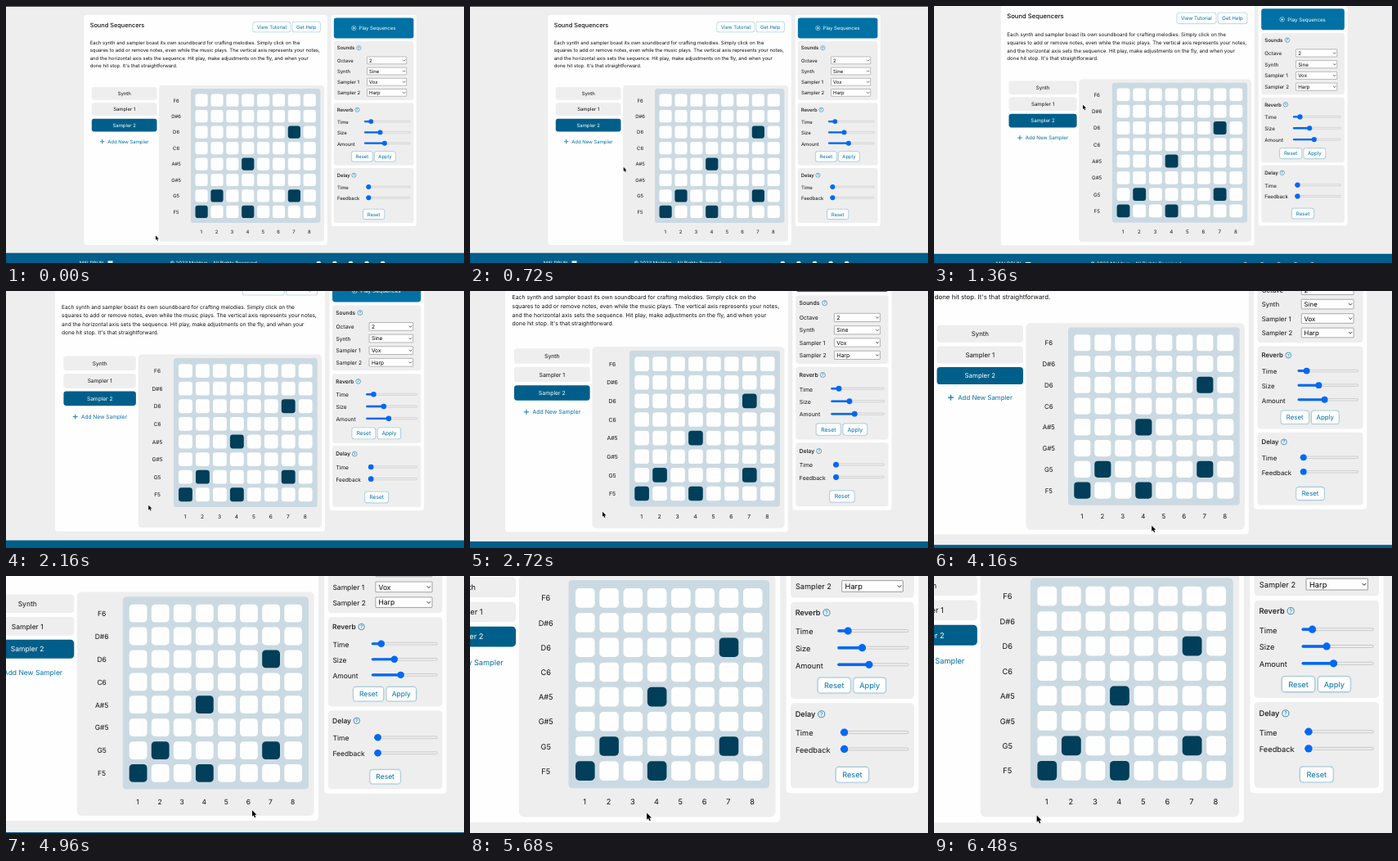
An HTML page for the animation above (6560 ms loop, 560 by 314 pixels).

```html
<!DOCTYPE html>
<html lang="en">
<head>
<meta charset="utf-8">
<title>Sound Sequencers</title>
<style>
  html, body { margin: 0; width: 100%; height: 100%; overflow: hidden; background: #eee; }
  svg { display: block; width: 100vw; height: 100vh; }
  text {
    font-family: Inter, Roboto, sans-serif;
    white-space: pre;
    text-rendering: geometricPrecision;
  }
</style>
</head>
<body>
<svg id="stage" viewBox="0 0 560 314"></svg>
<script>
const NS = 'http://www.w3.org/2000/svg';
const stage = document.getElementById('stage');
const INK = '#111', GREY = '#eee', WHITE = '#fefefe';
const BLUE = '#0071a5', DEEP = '#005f8a', NIGHT = '#003e59', ACCENT = '#0068f6';
const SIZE = 5.93;

function add(tag, attrs, parent = stage) {
  const el = document.createElementNS(NS, tag);
  for (const key in attrs) el.setAttribute(key, attrs[key]);
  return parent.appendChild(el);
}

// Rectangle given by its edges.
function box(x1, y1, x2, y2, fill, rx = 0, more = {}) {
  return add('rect', { x: x1, y: y1, width: x2 - x1, height: y2 - y1, rx, fill, ...more });
}

// Text placed by the middle of its capitals.
function label(str, x, y, fill = INK, anchor = 'start', size = SIZE, weight = 400) {
  const el = add('text', {
    x, y: y + size * 0.36, fill, 'text-anchor': anchor, 'font-size': size, 'font-weight': weight
  });
  el.textContent = str;
}

const line = (d, stroke, width) =>
  add('path', { d, stroke, fill: 'none', 'stroke-width': width, 'stroke-linecap': 'round', 'stroke-linejoin': 'round' });

const ring = (cx, cy, r, stroke) =>
  add('circle', { cx, cy, r, stroke, fill: 'none', 'stroke-width': 0.5 });

// White button with a soft blue glow.
function button(str, x1, y1, x2, y2) {
  for (const width of [2.4, 1.6, 0.8])
    box(x1, y1, x2, y2, WHITE, 2, { stroke: BLUE, 'stroke-width': width, 'stroke-opacity': 0.13 });
  box(x1, y1, x2, y2, WHITE, 2);
  label(str, (x1 + x2) / 2, (y1 + y2) / 2, BLUE, 'middle');
}

function heading(str, y, iconX) {
  label(str, 404.7, y, INK, 'start', SIZE, 500);
  ring(iconX, y, 2.6, BLUE);
  label('?', iconX, y, BLUE, 'middle', 4.2);
}

function select(name, value, y) {
  label(name, 404.9, y);
  box(441.5, y - 4.6, 489.7, y + 4.2, WHITE, 0.4, { stroke: '#666', 'stroke-width': 0.4 });
  label(value, 444, y - 0.1, '#000');
  line(`M485.5 ${y - 0.7}l1.3 1.3l1.3-1.3`, INK, 0.6);
}

function slider(name, y, start, value) {
  label(name, 404.9, y);
  const mid = y - 0.7;
  box(start, mid - 0.95, 494, mid + 0.95, '#efefef', 0.95, { stroke: '#a8a8a8', 'stroke-width': 0.35 });
  box(start, mid - 1.1, value, mid + 1.1, ACCENT, 1.1);
  add('circle', { cx: value, cy: mid, r: 2.96, fill: ACCENT });
}

function drawIntro() {
  box(95.5, 11, 392.8, 291.9, WHITE, 3);
  label('Sound Sequencers', 102.7, 23.2, INK, 'start', 7.35, 500);
  button('View Tutorial', 302.4, 19.7, 347.4, 31.3);
  button('Get Help', 350.5, 19.7, 383.8, 31.3);
  [
    'Each synth and sampler boast its own soundboard for crafting melodies. Simply click on the',
    'squares to add or remove notes, even while the music plays. The vertical axis represents your notes,',
    'and the horizontal axis sets the sequence. Hit play, make adjustments on the fly, and when your',
    "done hit stop. It's that straightforward."
  ].forEach((str, i) => label(str, 102.7, 44.8 + i * 9.37));
}

function drawTabs() {
  ['Synth', 'Sampler 1', 'Sampler 2'].forEach((str, i) => {
    const y = 98.9 + i * 19.4, active = i === 2;
    box(104.8, y, 184.5, y + 15.9, active ? DEEP : GREY, 3);
    label(str, 144.7, y + 8, active ? '#fff' : INK, 'middle');
  });
  line('M115.4 165.7h4.6M117.7 163.4v4.6', BLUE, 0.8);
  label('Add New Sampler', 124.2, 165.7, BLUE);
}

function drawGrid() {
  box(187, 97.1, 389.1, 287.7, GREY, 4);
  box(226, 101.1, 384.4, 265.1, '#cbdae2', 3);
  const on = new Set(['6,2', '3,4', '1,6', '6,6', '0,7', '3,7']);
  const notes = ['F6', 'D#6', 'D6', 'C6', 'A#5', 'G#5', 'G5', 'F5'];
  notes.forEach((note, row) => {
    const y = 115.2 + row * 19.46;
    label(note, 208.1, y + 0.2, INK, 'middle');
    for (let col = 0; col < 8; col++) {
      const x = 239.1 + col * 18.88;
      box(x - 7.6, y - 7.6, x + 7.6, y + 7.6, on.has(`${col},${row}`) ? NIGHT : WHITE, 3.1);
      if (!row) label(col + 1, x - 0.4, 275.6, INK, 'middle');
    }
  });
}

function drawControls() {
  box(397.6, 11, 501.9, 268.9, WHITE, 3);
  box(400.9, 14.4, 498.4, 39.4, BLUE, 3);
  ring(425.4, 27, 2.7, '#fff');
  add('path', { d: 'M424.6 25.6v2.8l2.3-1.4z', fill: '#fff' });
  label('Play Sequences', 431.6, 27, '#fff');

  box(401, 43, 498.4, 115, GREY, 3);
  heading('Sounds', 51.2, 431.4);
  [['Octave', '2'], ['Synth', 'Sine'], ['Sampler 1', 'Vox'], ['Sampler 2', 'Harp']]
    .forEach(([name, value], i) => select(name, value, 66.6 + i * 13.17));

  box(401, 118.4, 498.4, 194.6, GREY, 3);
  heading('Reverb', 126.7, 429.4);
  slider('Time', 141.8, 438, 446.3);
  slider('Size', 155.1, 438, 457.5);
  slider('Amount', 168.4, 438, 462.9);
  button('Reset', 422.9, 178.3, 447.9, 189.6);
  button('Apply', 451.1, 178.3, 475.7, 189.6);

  box(401, 197.9, 498.4, 264.9, GREY, 3);
  heading('Delay', 206.7, 425.4);
  slider('Time', 221.7, 440.4, 443.4);
  slider('Feedback', 234.9, 440.4, 443.4);
  button('Reset', 437.1, 248.8, 462.2, 260);
}

function drawFooter() {
  box(0, 301.7, 560, 330, DEEP);
  label('MALDRUN', 89.7, 313.4, '#fff');
  box(124.5, 311.4, 130.5, 317.4, '#e4eef3');
  label('© 2023 Maldrun - All Rights Reserved', 253.7, 313.4, '#fff', 'middle');
  for (let i = 0; i < 5; i++)
    add('circle', { cx: 382.3 + i * 19.6, cy: 314.6, r: 2.9, fill: '#e4eef3' });
}

box(0, 0, 560, 330, GREY);
box(0, 0, 560, 0.8, '#222');
drawIntro();
drawTabs();
drawGrid();
drawControls();
drawFooter();
const pointer = add('path', {
  d: 'M0 0V5.2L1.2 4.1L2.1 6.2L3 5.8L2.1 3.8H3.8Z',
  fill: '#000', stroke: '#fff', 'stroke-width': 0.4, 'paint-order': 'stroke'
});

const LOOP = 6560;
const FOCUS = { x: 417.5, y: 275.5 };
// Pointer stops: time, x, y on the page.
const STOPS = [
  [0, 183, 280.6], [1360, 191.7, 127], [2160, 198.3, 263], [3280, 197.2, 278.2],
  [4160, 303.2, 284], [4960, 336.3, 283], [6480, 231, 286.4], [LOOP, 231, 286.4]
];
const clamp = v => Math.min(1, Math.max(0, v));

function pointerAt(t) {
  const i = STOPS.findIndex(stop => stop[0] > t);
  const [t0, x0, y0] = STOPS[i - 1], [t1, x1, y1] = STOPS[i];
  const u = (t - t0) / (t1 - t0), e = u * u * (3 - 2 * u);
  return [x0 + (x1 - x0) * e, y0 + (y1 - y0) * e];
}

// The visible part of the page shrinks evenly around the focus.
function render(now) {
  const t = now % LOOP;
  const k = 1 - 0.361 * clamp((t - 800) / 4960);
  stage.setAttribute('viewBox',
    [FOCUS.x * (1 - k), FOCUS.y * (1 - k), 560 * k, 314 * k].join(' '));
  pointer.setAttribute('transform', `translate(${pointerAt(t)})`);
}

const start = performance.now();
function tick() {
  render(performance.now() - start);
  requestAnimationFrame(tick);
}
tick();
</script>
</body>
</html>
```
